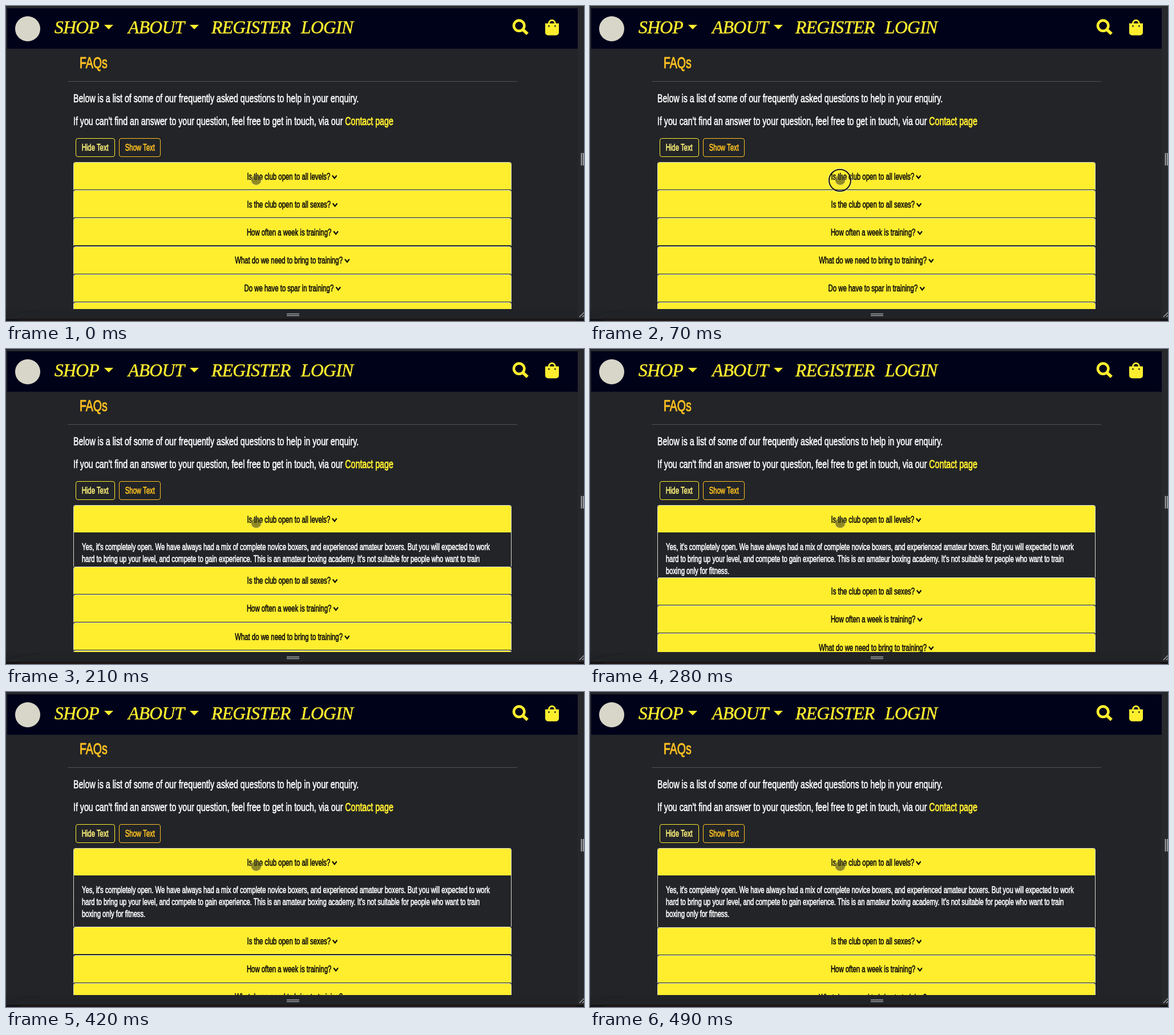
Recreate the animation shown at these times as an HTML page. Size 1013 by 553 pixels, loop 0.91 s.

```html
<!DOCTYPE html>
<html lang="en">
<head>
<meta charset="utf-8">
<title>FAQs</title>
<style>
  :root { --bg: #222428; --yellow: #ffee2e; --amber: #ffc222; --loop: 910ms; }
  html, body { margin: 0; width: 100%; height: 100%; overflow: hidden; background: var(--bg); }
  .stage { position: relative; width: 1013px; height: 553px; overflow: hidden; color: #fff; }
  .stage > * { position: absolute; }
  svg { display: block; }

  .nav { left: 2px; top: 4px; width: 1000px; height: 71px; background: #00021a; }
  .menu {
    top: 18px; color: var(--yellow); white-space: nowrap;
    font: italic 31.5px/40px "Liberation Serif", serif;
    letter-spacing: -.6px; -webkit-text-stroke: .5px;
  }

  /* condensed sans face */
  .t {
    display: block; white-space: nowrap; font: 16px/24px "Liberation Sans", Arial, sans-serif;
    -webkit-text-stroke: .65px; transform: scaleX(.71); transform-origin: 0 50%;
  }
  .lead { left: 118px; font-size: 20px; }
  .lead b { font-weight: 400; color: var(--yellow); -webkit-text-stroke: .9px; }
  h1.t { margin: 0; left: 129px; top: 88px; font-size: 27.5px; color: var(--amber); -webkit-text-stroke: 1px; }
  .rule { left: 108px; top: 132px; width: 788px; height: 1px; background: #515255; }
  .btn {
    top: 232px; height: 31px; border: 1px solid; border-radius: 4px;
    display: flex; align-items: center; justify-content: center;
  }
  .btn .t, .head .t { transform-origin: 50% 50%; }

  .list { left: 118px; top: 274px; width: 768px; height: 258px; overflow: hidden; }
  .card {
    box-sizing: border-box; margin-bottom: .2px; overflow: hidden;
    border: solid #dcdcd2; border-width: 1px 1px 0; border-radius: 4px 4px 0 0;
  }
  .head {
    box-sizing: border-box; height: 48px; padding-top: 2px;
    background: var(--yellow); color: #0b0b0b; border-bottom: 1px solid var(--bg);
    display: flex; align-items: center; justify-content: center;
  }
  .head svg { display: inline; margin-left: 4px; }
  .body { height: 0; overflow: hidden; animation: open var(--loop) step-end infinite; }
  .body .t { margin-left: 14px; line-height: 20.8px; letter-spacing: -.11px; }
  .body .t:first-child { margin-top: 15px; }

  .dot { left: 430px; top: 297px; width: 17px; height: 17px; border-radius: 50%; background: rgba(70, 70, 30, .6); box-shadow: 0 0 0 1px rgba(200, 200, 140, .6); }
  .ring {
    left: 418px; top: 286px; width: 36px; height: 36px; border: 2px solid #15150c; border-radius: 50%;
    box-shadow: 0 0 0 1px rgba(255, 255, 255, .75); opacity: 0; animation: tap var(--loop) step-end infinite;
  }

  /* one step = 70 ms = 1/13 of the loop; heights follow "ease" over 370 ms */
  @keyframes open {
    0% { height: 0; }
    15.385% { height: 24px; }
    23.077% { height: 58.5px; }
    30.769% { height: 77.5px; }
    38.462% { height: 86px; }
    46.154% { height: 89.2px; }
    53.846%, 100% { height: 89.5px; }
  }
  @keyframes tap {
    0% { opacity: 0; }
    7.692% { opacity: 1; }
    23.077%, 100% { opacity: 0; }
  }
</style>
</head>
<body>
<div class="stage">
  <div class="nav"></div>
  <svg width="1013" height="75" fill="#ffee2e">
    <circle cx="38" cy="40" r="22" fill="#d8d6c8"/>
    <path d="M172 33h16l-8 8zM322 33h16l-8 8z"/>
    <g fill="none" stroke="#ffee2e">
      <circle cx="899.2" cy="34.6" r="9.2" stroke-width="4.6"/>
      <path d="M906 41.5l8 7.5" stroke-width="5.4"/>
      <path d="M951.5 33v-2.5a5.4 5.4 0 0 1 10.8 0V33" stroke-width="3"/>
    </g>
    <path d="M945 30.5h24v16a5 5 0 0 1-5 5h-14a5 5 0 0 1-5-5z"/>
    <g fill="#00021a"><circle cx="951.5" cy="35.2" r="1.3"/><circle cx="962.3" cy="35.2" r="1.3"/></g>
  </svg>
  <span class="menu" style="left:85px">SHOP</span>
  <span class="menu" style="left:214px">ABOUT</span>
  <span class="menu" style="left:360px">REGISTER</span>
  <span class="menu" style="left:517px">LOGIN</span>

  <h1 class="t">FAQs</h1>
  <div class="rule"></div>
  <span class="t lead" style="top:150px">Below is a list of some of our frequently asked questions to help in your enquiry.</span>
  <span class="t lead" style="top:190px">If you can't find an answer to your question, feel free to get in touch, via our <b>Contact page</b></span>
  <div class="btn" style="left:122px;width:67px;border-color:var(--yellow);color:#fff27a"><span class="t">Hide Text</span></div>
  <div class="btn" style="left:198px;width:71px;color:var(--amber)"><span class="t">Show Text</span></div>

  <div class="list"></div>
  <div class="dot"></div>
  <div class="ring"></div>

  <svg width="1013" height="553">
    <path d="M0 0h1013v4H0zM1002 4h11v549h-11z" fill="#27282c"/>
    <path d="M0 4h2v545H0z" fill="#2a2b2f"/>
    <path d="M0 532h1002v21H0z" fill="#212327"/>
    <path d="M0 546Q22 536 62 535" fill="none" stroke="#1b1c20"/>
    <path d="M0 549h1013v4H0z" fill="#151314"/>
    <path d="M24 551.5H1000" stroke="#33201d"/>
    <path d="M492 540.5h22M492 543.5h22" stroke="#a2a3a5" stroke-width="1.5"/>
    <path d="M1008.5 258v22M1011.7 258v22" stroke="#c4c5c7" stroke-width="1.5"/>
    <path d="M1005 546l8-8M1010 546l3-3" stroke="#a2a3a5" stroke-width="1.5"/>
  </svg>
</div>
<script>
  const questions = [
    "Is the club open to all levels?",
    "Is the club open to all sexes?",
    "How often a week is training?",
    "What do we need to bring to training?",
    "Do we have to spar in training?",
    "",
  ];
  const answer = [
    "Yes, it's completely open. We have always had a mix of complete novice boxers, and experienced amateur boxers. But you will expected to work",
    "hard to bring up your level, and compete to gain experience. This is an amateur boxing academy. It's not suitable for people who want to train",
    "boxing only for fitness.",
  ];
  const line = s => `<span class="t">${s}</span>`;
  const chevron = `<svg width="14" height="9" viewBox="0 0 14 9">
    <path d="M1.5 1.5L7 6.5l5.5-5" fill="none" stroke="#0b0b0b" stroke-width="2.7"/></svg>`;
  const card = (q, i) => `<div class="card"><div class="head">${line(q + chevron)}</div>${
    i ? "" : `<div class="body">${answer.map(line).join("")}</div>`}</div>`;
  document.querySelector(".list").innerHTML = questions.map(card).join("");
</script>
</body>
</html>
```
